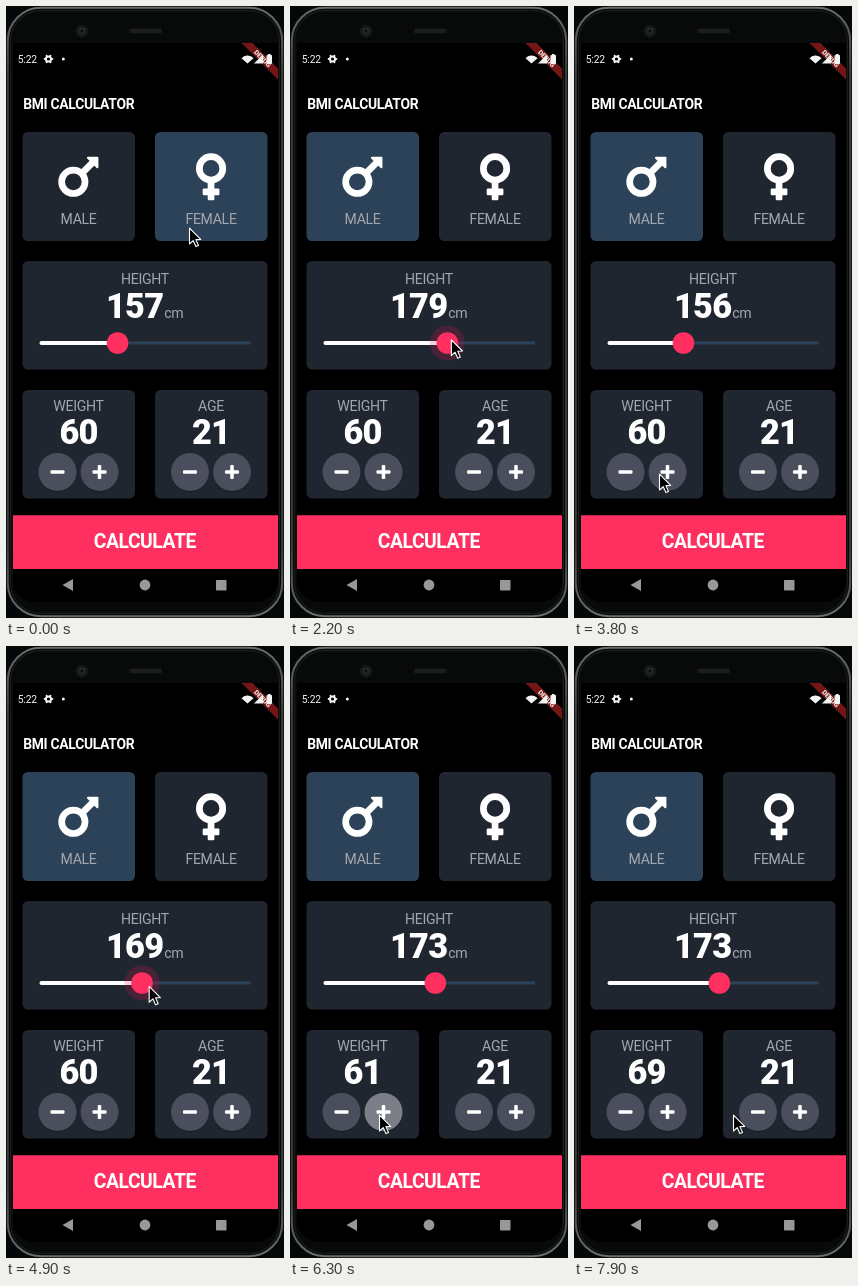
Animation of 278 by 612 pixels, one loop 8000 ms. Source, as an HTML page with a canvas:

```html
<!DOCTYPE html>
<html lang="en">
<head>
<meta charset="utf-8">
<title>BMI calculator</title>
<style>
html, body { margin: 0; width: 100%; height: 100%; overflow: hidden; background: #050808; }
canvas { display: block; width: 278px; height: 612px; }
</style>
</head>
<body>
<canvas id="stage"></canvas>
<script>
const W = 278, H = 612, LOOP = 8000, STEP = 100;
const canvas = document.getElementById('stage');
const ratio = window.devicePixelRatio || 1;
canvas.width = W * ratio;
canvas.height = H * ratio;
const ctx = canvas.getContext('2d');

const CARD = '#20262f', ACTIVE = '#2c4258', PINK = '#ff2f60', LABEL = '#a3a6ad';
const CARD_W = 112.5, CARD_H = 108.5, LEFT = 16.5, RIGHT = 149;

const clamp = (v, lo, hi) => Math.min(hi, Math.max(lo, v));
const ramp = (t, from, to) => clamp((t - from) / (to - from), 0, 1);
const smooth = k => k * k * (3 - 2 * k);
const pulse = (t, from, to, fade) => ramp(t, from, from + fade) - ramp(t, to - fade, to);

// Each move is [begin, end, target]; a value rests between moves.
function follow(value, moves, t) {
  for (const [from, to, target] of moves) value += (target - value) * smooth(ramp(t, from, to));
  return value;
}

// Pointer gestures: [begin, end, x, y]
const gestures = [
  [0, 200, 200, 207],
  [700, 1200, 101, 335],
  [1200, 1600, 107, 344],
  [1600, 2300, 164, 333],
  [2450, 3250, 103, 335],
  [3400, 3800, 85, 468],
  [3900, 4300, 116, 338],
  [4400, 5150, 152, 341],
  [5150, 5500, 89, 469],
  [7600, 7900, 159, 469]
];
const xMoves = gestures.map(([from, to, x]) => [from, to, x]);
const yMoves = gestures.map(([from, to, , y]) => [from, to, y]);
const heightMoves = [[1600, 2300, 180], [2450, 3250, 156], [4400, 5150, 173]];

// One tap, then eight more at a steady rate.
function weightAt(t) {
  const quickTaps = clamp(Math.floor((t - 6420) / 175) + 1, 0, 8);
  return 60 + (t >= 6000 ? 1 : 0) + quickTaps;
}

function rect(x, y, w, h, r, fill) {
  ctx.fillStyle = fill;
  ctx.beginPath();
  ctx.roundRect(x, y, w, h, r);
  ctx.fill();
}

function outline(inset, r, color, width) {
  ctx.strokeStyle = color;
  ctx.lineWidth = width;
  ctx.beginPath();
  ctx.roundRect(inset, inset, W - 2 * inset, H - 2 * inset, r);
  ctx.stroke();
}

function disc(x, y, r, fill) {
  ctx.fillStyle = fill;
  ctx.beginPath();
  ctx.arc(x, y, r, 0, Math.PI * 2);
  ctx.fill();
}

function ring(x, y, r, width, color) {
  ctx.strokeStyle = color;
  ctx.lineWidth = width;
  ctx.beginPath();
  ctx.arc(x, y, r, 0, Math.PI * 2);
  ctx.stroke();
}

function poly(points, fill, edge = fill, width = 0) {
  ctx.fillStyle = fill;
  ctx.beginPath();
  points.forEach(([x, y]) => ctx.lineTo(x, y));
  ctx.closePath();
  ctx.fill();
  if (!width) return;
  ctx.strokeStyle = edge;
  ctx.lineWidth = width;
  ctx.lineJoin = 'round';
  ctx.stroke();
}

function text(str, x, y, size, weight, color, align = 'center') {
  ctx.font = `${weight} ${size}px Roboto, sans-serif`;
  ctx.letterSpacing = `${-0.022 * size}px`;
  ctx.textAlign = align;
  ctx.fillStyle = color;
  ctx.fillText(str, x, y);
}

function drawPhone() {
  rect(0, 0, W, H, 0, '#050808');
  rect(1, 1, W - 2, H - 2, 34, '#080909');
  const metal = ctx.createLinearGradient(0, 0, 0, H);
  metal.addColorStop(0, '#6c6f6f');
  metal.addColorStop(0.12, '#3c3f3f');
  metal.addColorStop(0.88, '#3c3f3f');
  metal.addColorStop(1, '#6c6f6f');
  outline(1.8, 33, metal, 2);
  outline(4.6, 30, '#1b1d1d', 1.2);
  rect(124, 22.5, 32, 5, 2.5, '#1b1d1e');
  disc(76, 25, 6.5, '#151718');
  disc(76, 25, 3.5, '#25292c');
  disc(76, 25, 1.6, '#0b0d10');
  rect(7, 37, 265, 559, [2, 2, 22, 22], '#000');
}

function drawBanner() {
  ctx.save();
  ctx.beginPath();
  ctx.rect(7, 37, 265, 60);
  ctx.clip();
  ctx.translate(272, 37);
  ctx.rotate(Math.PI / 4);
  ctx.fillStyle = '#741616';
  ctx.fillRect(-26, 18, 52, 7.8);
  text('DEBUG', 0, 24.3, 6.8, 900, '#f0e6e6');
  ctx.restore();
}

function drawStatus() {
  const white = '#f4f4f4';
  text('5:22', 11.8, 57, 10.3, 400, white, 'left');
  ring(42.5, 53, 2.6, 2, white);
  for (let i = 0; i < 6; i++) {
    const a = i * Math.PI / 3;
    disc(42.5 + 3.8 * Math.cos(a), 53 + 3.8 * Math.sin(a), 1, white);
  }
  disc(57.3, 53, 1.5, white);
  drawBanner();
  ctx.fillStyle = white;
  ctx.beginPath();
  ctx.moveTo(241.5, 57.5);
  ctx.arc(241.5, 57.5, 8, -Math.PI * 0.77, -Math.PI * 0.23);
  ctx.fill();
  poly([[248, 57.5], [257, 57.5], [257, 48.5]], white);
  rect(260.5, 49, 5.5, 9, 0.8, white);
  rect(262, 48, 2.5, 1.5, 0, white);
}

// Gender signs share a 512-unit grid.
function withGrid(x, draw) {
  ctx.save();
  ctx.translate(x, 144);
  ctx.scale(0.1045, 0.1045);
  draw();
  ctx.restore();
}

function drawMale() {
  withGrid(52.3, () => {
    ring(144, 304, 112, 64, '#fff');
    poly([[284, 74], [374, 74], [374, 164]], '#fff', '#fff', 20);
    ctx.beginPath();
    ctx.moveTo(225, 223);
    ctx.lineTo(335, 113);
    ctx.lineWidth = 64;
    ctx.stroke();
  });
}

function drawFemale() {
  withGrid(190, () => {
    ring(144, 176, 112, 64, '#fff');
    rect(112, 300, 64, 180, 12, '#fff');
    rect(64, 368, 160, 64, 12, '#fff');
  });
}

function drawGender(x, label, active, drawSign) {
  rect(x, 126, CARD_W, CARD_H + 0.5, 5.5, active ? ACTIVE : CARD);
  drawSign();
  text(label, x + 56, 217.8, 14.1, 400, LABEL);
}

function drawButton(x, plus, press) {
  disc(x, 467, 19, 'rgba(0,0,0,0.25)');
  disc(x, 466, 19, '#4b4e5c');
  if (press) disc(x, 466, 19, `rgba(255,255,255,${0.27 * press})`);
  rect(x - 7, 464.3, 14, 3.5, 1, '#fff');
  if (plus) rect(x - 1.75, 459, 3.5, 14, 1, '#fff');
}

function drawCounter(x, label, value, press) {
  rect(x, 384, CARD_W, CARD_H, 5.5, CARD);
  const mid = x + 56;
  text(label, mid, 404.5, 14.1, 400, LABEL);
  text(value, mid, 438.4, 34.3, 900, '#fff');
  drawButton(mid - 21, false, 0);
  drawButton(mid + 21, true, press);
}

function drawHeight(value, halo) {
  rect(LEFT, 255, 245, CARD_H, 5.5, CARD);
  text('HEIGHT', 139, 277.8, 14.1, 400, LABEL);
  text(Math.round(value), 100, 311.8, 34.3, 900, '#fff', 'left');
  text('cm', 158.3, 311.8, 14.1, 400, LABEL, 'left');
  const x = 33.5 + (value - 120) * 2.11;
  rect(33.5, 335.6, 211.5, 2.8, 1.4, ACTIVE);
  rect(33.5, 335, x - 33.5, 4, 2, '#fff');
  if (halo) disc(x, 337, 17.5 * halo, 'rgba(235,21,85,0.2)');
  disc(x, 337, 10.8, PINK);
}

function drawNav() {
  const grey = '#989898';
  poly([[56.5, 579], [67, 573], [67, 585]], grey);
  disc(139, 579, 5.4, grey);
  rect(210, 574, 10.5, 10.5, 0.8, grey);
}

function drawCursor(x, y) {
  ctx.save();
  ctx.translate(x + 0.5, y + 0.2);
  poly([[0, 0], [0, 15.8], [3.7, 12.4], [6.4, 18.4], [9, 17.3], [6.4, 11.4], [11.2, 11.2]],
    '#000', '#fff', 1.1);
  ctx.restore();
}

function draw(t) {
  ctx.setTransform(ratio, 0, 0, ratio, 0, 0);
  const male = t >= 500;
  const halo = pulse(t, 1500, 3600, 200) + pulse(t, 4400, 5300, 200);

  drawPhone();
  drawStatus();
  text('BMI CALCULATOR', 17.2, 102.5, 13.9, 700, '#fff', 'left');
  drawGender(LEFT, 'MALE', male, drawMale);
  drawGender(RIGHT, 'FEMALE', !male, drawFemale);
  drawHeight(follow(157, heightMoves, t), halo);
  drawCounter(LEFT, 'WEIGHT', weightAt(t), pulse(t, 5600, 7900, 300));
  drawCounter(RIGHT, 'AGE', 21, 0);

  rect(7, 509.3, 265, 53.7, 0, PINK);
  text('CALCULATE', 138.8, 542.4, 19.3, 700, '#fff');
  drawNav();
  drawCursor(follow(183, xMoves, t), follow(222, yMoves, t));
}

const start = performance.now();
function tick() {
  const t = (performance.now() - start) % LOOP;
  draw(Math.floor(t / STEP) * STEP);
  requestAnimationFrame(tick);
}
tick();
</script>
</body>
</html>
```
